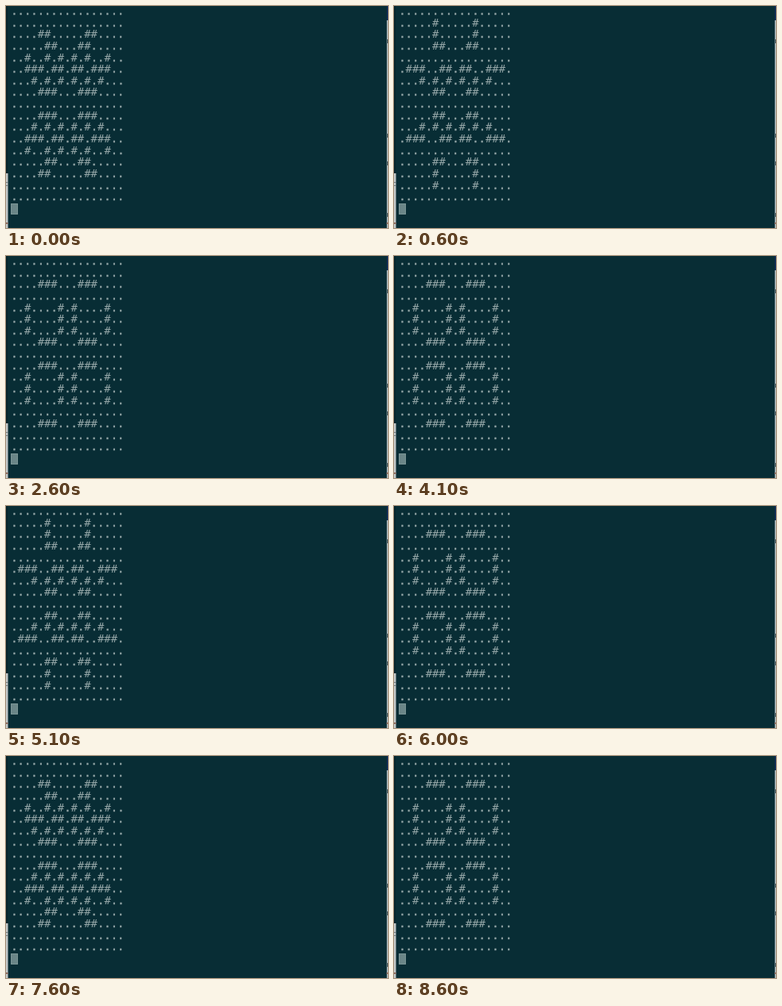
An HTML page that plays this animation: 480x280 px, repeating every 8.8 s.

```html
<!DOCTYPE html>
<html lang="en">
<head>
<meta charset="utf-8">
<title>Pulsar</title>
<style>
html, body { margin: 0; width: 100%; height: 100%; overflow: hidden; background: #082d35; }
svg { display: block; width: 480px; height: 280px; }
text { font: 13.9px "DejaVu Sans Mono", monospace; fill: #93a5a6; white-space: pre; }
.dots { stroke: #93a5a6; stroke-width: 0.4px; }
.edge { font: 9px "DejaVu Sans", sans-serif; fill: #47555a; }
</style>
</head>
<body>
<svg id="stage" viewBox="0 0 480 280">
  <rect width="480" height="280" fill="#082d35"/>
  <rect width="2" height="211" fill="#06232a"/>
  <rect y="211" width="2.5" height="69" fill="#c3c7c7"/>
  <rect y="273" width="2.5" height="2" fill="#8d6a5c"/>
  <text class="edge" x="-2" y="227">c</text>
  <rect x="478.6" width="1.4" height="18" fill="#102a5c"/>
  <rect x="478.6" y="18" width="1.4" height="262" fill="#c3c9ca"/>
  <rect x="478.6" y="273" width="1.4" height="2" fill="#9a6a58"/>
  <g fill="#47555a">
    <rect x="479" y="42" width="1" height="5"/>
    <rect x="479" y="161" width="1" height="5"/>
    <rect x="479" y="196" width="1" height="5"/>
    <rect x="479" y="261" width="1" height="5"/>
  </g>
  <rect x="6.5" y="249.5" width="8" height="13" fill="#6b8688" stroke="#7a9495"/>
</svg>
<script>
const LOOP = 8800, FIRST = 600, STEP = 500;
const LEFT = 6.2, BASE = 10.98, PITCH = 14.64;
const EMPTY = '.........';

// Upper-left quarter of each phase, rows 0 to 8, in order of showing
const phases = [
  [EMPTY, EMPTY, '....##...', '.....##..', '..#..#.#.', '..###.##.', '...#.#.#.', '....###..', EMPTY],
  [EMPTY, '.....#...', '.....#...', '.....##..', EMPTY, '.###..##.', '...#.#.#.', '.....##..', EMPTY],
  [EMPTY, EMPTY, '....###..', EMPTY, '..#....#.', '..#....#.', '..#....#.', '....###..', EMPTY]
];

const stage = document.getElementById('stage');
const mirror = list => [...list, ...list.slice(0, -1).reverse()];

function add(parent, tag, attrs = {}) {
  const node = document.createElementNS('http://www.w3.org/2000/svg', tag);
  for (const key in attrs) node.setAttribute(key, attrs[key]);
  return parent.appendChild(node);
}

function drawPhase(quarter) {
  const group = add(stage, 'g');
  mirror(quarter).forEach((half, row) => {
    const line = add(group, 'text', { x: LEFT, y: BASE + row * PITCH });
    for (const run of mirror([...half]).join('').match(/\.+|#+/g)) {
      add(line, 'tspan', run[0] === '.' ? { class: 'dots' } : {}).textContent = run;
    }
  });
  return group;
}

const starts = [0];
for (let t = FIRST; t < LOOP; t += STEP) starts.push(t);

phases.forEach((quarter, phase) => {
  const frames = starts.map((t, i) => ({
    offset: t / LOOP,
    opacity: i % phases.length === phase ? 1 : 0,
    easing: 'steps(1, end)'
  }));
  frames.push({ ...frames[frames.length - 1], offset: 1 });
  drawPhase(quarter).animate(frames, { duration: LOOP, iterations: Infinity });
});
</script>
</body>
</html>
```
